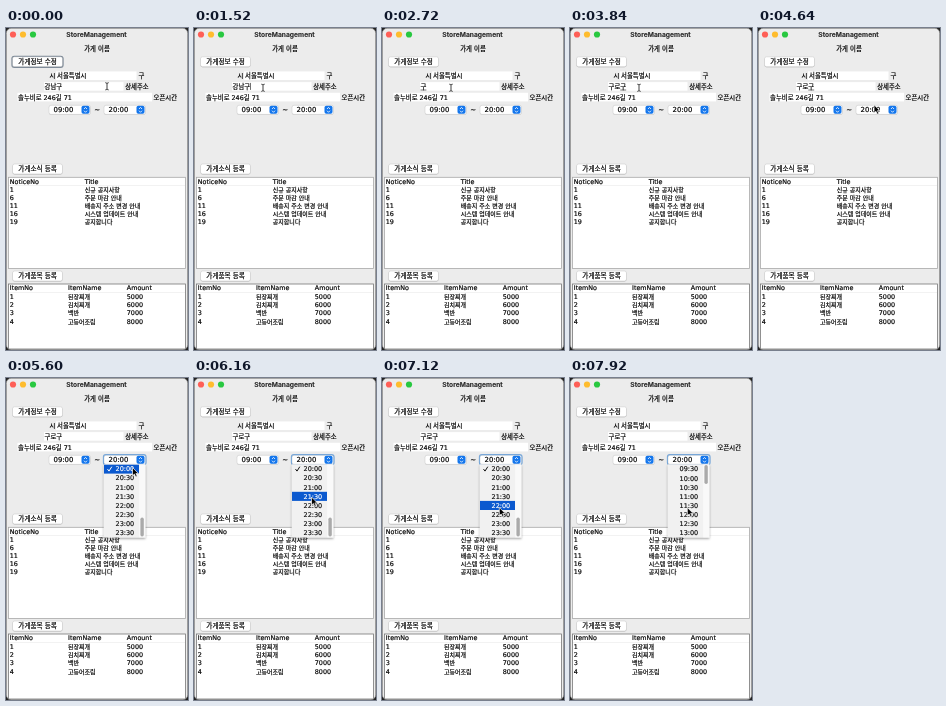
Animation of 182x322 px, one loop 8 s. Source, as an HTML page:

```html
<!DOCTYPE html>
<html lang="ko">
<head>
<meta charset="utf-8">
<title>StoreManagement</title>
<style>
  html, body { margin: 0; width: 100%; height: 100%; overflow: hidden; background: #222; }
  svg { display: block; width: 100vw; height: 100vh; color: #000; }
  text { font-family: "DejaVu Sans", "Noto Sans CJK KR", "Noto Sans CJK", sans-serif; font-size: 6.4px;
    fill: currentColor; stroke: currentColor; stroke-width: .18px; white-space: pre; }
  .title { font: 600 6.7px Inter, sans-serif; color: #222; letter-spacing: .05px; }
  .button { font-size: 6.6px; }
  .cell { font-size: 6px; }
  .head, .num { font-size: 6.4px; }
  .time { font-size: 6.9px; }
  .item { font-size: 6.5px; }
</style>
</head>
<body>
<svg id="stage" viewBox="0 0 182 322">
  <defs>
    <clipPath id="listClip"><rect x="98" y="86.5" width="41" height="73"/></clipPath>
    <filter id="shadow" x="-20%" y="-10%" width="140%" height="125%">
      <feDropShadow dx="0" dy="1.2" stdDeviation="1.3" flood-opacity=".4"/>
    </filter>
  </defs>
</svg>
<script>
const LOOP = 8000, STEP = 80;
const ROW = 9.1, LIST_TOP = 86.5, VISIBLE = 8, ITEMS = 29;
const stage = document.getElementById('stage');

function add(tag, attrs, parent = stage) {
  const el = document.createElementNS('http://www.w3.org/2000/svg', tag);
  for (const key in attrs) el.setAttribute(key, attrs[key]);
  return parent.appendChild(el);
}
const box = (x, y, width, height, fill, more = {}, parent) =>
  add('rect', { x, y, width, height, fill, ...more }, parent);
function label(x, y, string, cls = '', parent) {
  const el = add('text', { x, y, class: cls }, parent);
  el.textContent = string;
  return el;
}
const centered = el => el.setAttribute('text-anchor', 'middle');
const show = (el, on) => el.setAttribute('visibility', on ? 'visible' : 'hidden');
const ring = (x, y, w, h, stroke) => box(x, y, w, h, 'none', { rx: 2.4, stroke, 'stroke-width': 1.1 });

function button(y, string) {
  box(6.5, y + .5, 50, 10, '#b4b4b4', { rx: 2 });
  box(6.5, y, 50, 10, '#fff', { rx: 2, stroke: '#c6c6c6', 'stroke-width': .5 });
  centered(label(31.6, y + 7.4, string, 'button'));
}
function combo(x, string) {
  box(x, 77.6, 41.5, 9.2, '#b8b8b8', { rx: 2 });
  box(x, 77.2, 41.5, 9.2, '#fff', { rx: 2, stroke: '#c8c8c8', 'stroke-width': .5 });
  label(x + 4.5, 84.4, string, 'time');
  box(x + 32.5, 77.8, 8, 8, '#1476ec', { rx: 1.8 });
  const cx = x + 36.5;
  add('path', { d: `M${cx - 1.5} 81l1.5 -1.6l1.5 1.6M${cx - 1.5} 82.7l1.5 1.6l1.5 -1.6`,
    fill: 'none', stroke: '#fff', 'stroke-width': .8 });
}
function table(top, bottom, border, columns, rows, first, pitch) {
  box(2.5, top, 177, bottom - top, '#fff', { stroke: border, 'stroke-width': .8 });
  columns.forEach(([x, name]) => label(x, top + 6.3, name, 'head'));
  box(3, top + 8, 176, .4, '#dedede');
  rows.forEach((row, i) => row.forEach((value, c) =>
    label(columns[c][0], first + i * pitch, value, /^\d+$/.test(value) ? 'num' : 'cell')));
}

// Window
box(.3, .3, 181.4, 321.4, '#ececec', { rx: 5, stroke: '#8c8c8c', 'stroke-width': .6 });
['#fe5f57', '#febc2e', '#28c840'].forEach((fill, i) => add('circle', { cx: 7 + i * 10, cy: 6.5, r: 3.1, fill }));
centered(label(90.5, 8.6, 'StoreManagement', 'title'));
centered(label(91, 22.6, '가게 이름'));

// Store form
button(28.8, '가게정보 수정');
const buttonRing = ring(5.9, 28.2, 51.2, 11.2, '#7f8b98');
label(43.6, 50.3, '시');
box(50, 43.4, 80.5, 8.6, '#fff');
label(51, 50.3, '서울특별시');
label(132.4, 50.3, '구');
box(38, 54.1, 79.5, 8.6, '#fff');
const district = label(38.5, 60.9, '강남구');
const underline = box(39, 61.7, 5.9, .6, '#222');
const caret = box(57.2, 54.9, .6, 7, '#111');
label(119.2, 60.9, '상세주소');
box(11.5, 64.8, 134.5, 8.6, '#fff');
label(12, 71.6, '솔누비로 246길 71');
label(147.5, 71.6, '오픈시간');
combo(43, '09:00');
label(88.2, 84.4, '~', 'time');
combo(98, '20:00');
const comboRing = ring(97.4, 76.6, 42.7, 10.4, '#78a7d8');

// Lists
button(136, '가게소식 등록');
table(149.3, 240.5, '#a9a9a9', [[3.8, 'NoticeNo'], [78.8, 'Title']], [
  ['1', '신규 공지사항'], ['6', '주문 마감 안내'], ['11', '배송지 주소 변경 안내'],
  ['16', '시스템 업데이트 안내'], ['19', '공지합니다']
], 163.7, 8.1);
button(243, '가게품목 등록');
table(256, 321, '#777', [[3.8, 'ItemNo'], [62, 'ItemName'], [120.8, 'Amount']], [
  ['1', '된장찌개', '5000'], ['2', '김치찌개', '6000'], ['3', '백반', '7000'], ['4', '고등어조림', '8000']
], 271.2, 8.1);

// Time popup
const popup = add('g', {});
box(97.8, 86.3, 41.6, 73.2, '#f1f1f1', { filter: 'url(#shadow)' }, popup);
const clip = add('g', { 'clip-path': 'url(#listClip)' }, popup);
const highlight = box(98, 0, 35, ROW, '#0b59cf', {}, clip);
const list = add('g', {}, clip);
const items = Array.from({ length: ITEMS }, (_, i) => {
  const minutes = 570 + i * 30;
  const time = String(Math.floor(minutes / 60)).padStart(2, '0') + ':' + String(minutes % 60).padStart(2, '0');
  return label(109.5, LIST_TOP + i * ROW + 6.9, time, 'item', list);
});
const LAST_TOP = ITEMS - VISIBLE;
const checkY = LIST_TOP + LAST_TOP * ROW + 4.6;
const check = add('path', { d: `M101.5 ${checkY}l1.5 2l2.8 -4.4`, fill: 'none', 'stroke-width': 1 }, list);
box(133.2, 86.5, 6, 72.8, '#f9f9f9', {}, popup);
const thumb = box(134.4, 0, 3.4, 19, '#aaa', { rx: 1.7 }, popup);

// Pointers, both with the hot spot at 0,0
const beam = add('g', {});
const beamPath = 'M-1.7 -3.6Q0 -3.6 0 -2.6Q0 -3.6 1.7 -3.6M0 -2.6V2.6M-1.7 3.6Q0 3.6 0 2.6Q0 3.6 1.7 3.6';
add('path', { d: beamPath, fill: 'none', stroke: '#fff', 'stroke-width': 1.7 }, beam);
add('path', { d: beamPath, fill: 'none', stroke: '#111', 'stroke-width': .8 }, beam);
const arrow = add('path', { d: 'M0 0V8.2L1.9 6.5L3.2 9.4L4.7 8.7L3.4 5.9H5.9Z',
  fill: '#000', stroke: '#fff', 'stroke-width': .7 });

const pointerPath = [[0, 101, 58.3], [80, 101, 58.3], [560, 69, 59.8], [4080, 69, 59.8],
  [4880, 129, 81.5], [5360, 129, 81.5], [6160, 117.5, 119], [6640, 117.3, 129.5], [8000, 117.3, 129.5]];
const typing = [[0, '강남구'], [1840, '강남'], [2080, '강'], [2320, ''], [2640, 'ㄱ'], [2720, '구'],
  [2960, '굴'], [3120, '구로'], [3360, '구록'], [3520, '구로구']];

function pointerAt(t) {
  const i = pointerPath.findIndex(p => p[0] > t);
  const [t0, x0, y0] = pointerPath[i - 1], [t1, x1, y1] = pointerPath[i];
  const k = (t - t0) / (t1 - t0), e = k * k * (3 - 2 * k);
  return [x0 + (x1 - x0) * e, y0 + (y1 - y0) * e];
}

function render(t) {
  const [x, y] = pointerAt(t);
  const inText = y < 74;
  for (const el of [beam, arrow]) el.setAttribute('transform', `translate(${x} ${y})`);
  show(beam, inText);
  show(arrow, !inText);

  const value = typing.filter(s => s[0] <= t).pop()[1];
  const end = 38.5 + value.length * 5.89;
  const editing = t >= 560 && t < 5040;
  const composing = t >= 2640 && t < 5040;
  district.textContent = value;
  caret.setAttribute('x', end + .2);
  underline.setAttribute('x', end - 5.9);
  show(caret, editing && !composing && t % 1000 >= 500);
  show(underline, composing);
  show(buttonRing, t < 560);

  const open = t >= 5040;
  show(comboRing, open);
  popup.setAttribute('display', open ? 'inline' : 'none');
  if (!open) return;

  const k = Math.min(1, Math.max(0, (t - 7360) / 560));
  const top = LAST_TOP * (1 - k * k * (3 - 2 * k));
  const hover = k > 0 ? -1 : Math.max(0, Math.floor((y - LIST_TOP) / ROW));
  list.setAttribute('transform', `translate(0 ${-top * ROW})`);
  thumb.setAttribute('y', 87 + 52.5 * top / LAST_TOP);
  highlight.setAttribute('y', LIST_TOP + hover * ROW);
  highlight.setAttribute('display', hover < 0 ? 'none' : 'inline');
  items.forEach((el, i) => el.style.color = hover >= 0 && i === LAST_TOP + hover ? '#fff' : '#111');
  check.setAttribute('stroke', hover === 0 ? '#fff' : '#111');
}

const start = performance.now();
function tick() {
  const t = (performance.now() - start) % LOOP;
  render(Math.floor(t / STEP) * STEP);
  requestAnimationFrame(tick);
}
tick();
</script>
</body>
</html>
```
